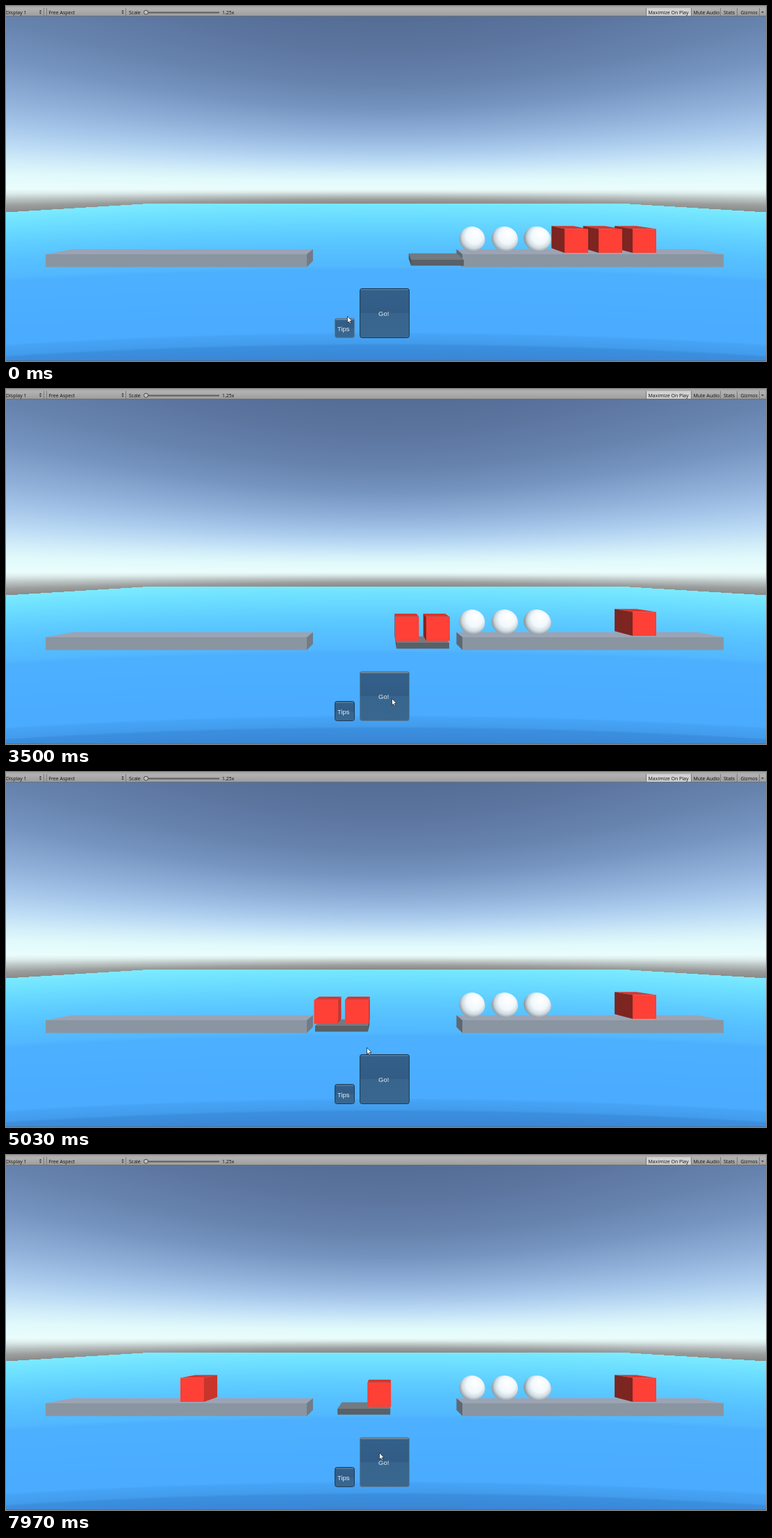
Write an HTML page with a canvas that moves like this. It is 1094 px wide and 512 px high and loops after 8 s.

```html
<!DOCTYPE html>
<html lang="en">
<head>
<meta charset="utf-8">
<title>River crossing</title>
<style>
html, body { margin: 0; width: 100%; height: 100%; overflow: hidden; background: #4bacff; }
canvas { display: block; }
</style>
</head>
<body>
<canvas id="stage" width="1094" height="512"></canvas>
<script>
const W = 1094, H = 512, LOOP = 8000, TICK = 77.3;
const VX = 547, VY = 263.5, FOCAL = 430;
const ctx = document.getElementById('stage').getContext('2d');

const RED = { front: '#ff4036', top: '#dc352d', left: '#7c2521', right: '#c9342b' };
const STONE = { front: '#8a95a2', top: '#9ca3b3', left: '#5d6873', right: '#717c88' };
const WOOD = { front: '#596066', top: '#737a80', left: '#464c52', right: '#51585e' };

// [offset above the horizon, colour]
const SKY = [[-40, '#7f7d7a'], [-22, '#858583'], [-15, '#9a9d9c'], [-9, '#bcc6c5'], [-4, '#dcecea'],
  [0, '#eafdfc'], [12, '#e2fafb'], [24, '#d3eef9'], [40, '#bbdaf4'], [60, '#a3c3e8'], [85, '#8cabd5'],
  [115, '#7694c0'], [150, '#6683ae'], [200, '#5b759f'], [249, '#556d95']];
// [height at the centre line, colour]
const SEA = [[280, '#7ceaff'], [293, '#71e3ff'], [310, '#67d8ff'], [330, '#5dcbff'], [352, '#56c0ff'],
  [374, '#52b8ff'], [380, '#4db0ff'], [470, '#4aabff'], [473, '#46a3f5'], [486, '#439cec'],
  [489, '#3b8fdf'], [512, '#3985d3']];

// [tick, x, y]
const PATH = [[0, 491, 447], [2, 491, 447], [7, 522, 430], [9, 532, 425], [15, 803, 325], [20, 803, 325],
  [21, 806, 326], [23, 806, 326], [25, 867, 325], [26, 908, 387], [29, 934, 486], [31, 660, 468],
  [33, 555, 446], [50, 555, 446], [53, 529, 396], [58, 519, 397], [65, 519, 397], [69, 488, 455],
  [74, 488, 455], [80, 453, 336], [85, 453, 336], [90, 534, 429], [94, 534, 429], [96, 537, 429], [104, 537, 429]];
const HOLDS = [43, 49, 59, 101];

const rgb = hex => [1, 3, 5].map(i => parseInt(hex.substr(i, 2), 16));

function ramp(stops) {
  const pts = stops.map(([p, c]) => [p, rgb(c)]);
  return v => {
    let i = 1;
    while (i < pts.length - 1 && v > pts[i][0]) i++;
    const [a, ca] = pts[i - 1], [b, cb] = pts[i];
    const f = Math.min(1, Math.max(0, (v - a) / (b - a)));
    return ca.map((c, n) => c + (cb[n] - c) * f);
  };
}

function poly(c, fill, ...p) {
  c.fillStyle = fill;
  c.beginPath();
  for (let i = 0; i < p.length; i += 2) c.lineTo(p[i], p[i + 1]);
  c.closePath();
  c.fill();
}

// Block in one-point perspective; s is the scale of its back face.
function block(c, x, y, w, h, s, col) {
  const r = x + w, b = y + h;
  const px = v => VX + (v - VX) * s, py = v => VY + (v - VY) * s;
  poly(c, col.top, x, y, px(x), py(y), px(r), py(y), r, y);
  if (x > VX) poly(c, col.left, x, y, px(x), py(y), px(x), py(b), x, b);
  if (r < VX) poly(c, col.right, r, y, px(r), py(y), px(r), py(b), r, b);
  c.fillStyle = col.front;
  c.fillRect(x, y, w, h);
}

const cube = (x, y) => block(ctx, x, y, 34, 34.5, .927, RED);

function ball(c, x, rx) {
  const g = c.createRadialGradient(x + 5, 328, 2, x + 2, 334, 22);
  g.addColorStop(0, '#ffffff');
  g.addColorStop(.5, '#f0f8fc');
  g.addColorStop(.75, '#cfdae0');
  g.addColorStop(1, '#7f8a91');
  c.fillStyle = g;
  c.beginPath();
  c.ellipse(x, 336, rx, 17.8, .35, 0, 7);
  c.fill();
}

function text(c, str, x, y, size, color, font = '"Liberation Sans", Arial, sans-serif') {
  c.font = size + 'px ' + font;
  c.fillStyle = color;
  c.fillText(str, x, y);
}

function toolbar(c) {
  const label = (s, x) => text(c, s, x, 11.5, 7, '#111', '"Open Sans", sans-serif');
  const arrows = x => {
    poly(c, '#333', x - 1.7, 8, x + 1.7, 8, x, 5.8);
    poly(c, '#333', x - 1.7, 9.6, x + 1.7, 9.6, x, 11.8);
  };
  const g = c.createLinearGradient(0, 0, 0, 15);
  g.addColorStop(0, '#a2a2a2');
  g.addColorStop(.25, '#b2b2b2');
  g.addColorStop(1, '#9c9c9c');
  c.fillStyle = g;
  c.fillRect(0, 0, W, 15);
  c.fillStyle = '#6c7076';
  c.fillRect(0, 14, W, 1);
  c.fillStyle = '#d2d2d2';
  c.fillRect(922, 3, 64, 11);
  c.fillStyle = '#7a7a7a';
  for (const x of [54, 58, 172, 921, 986, 1028, 1052, 1084]) c.fillRect(x, 3, 1, 11);
  label('Display 1', 0);
  label('Free Aspect', 61.5);
  label('Scale', 177);
  label('1.25x', 311);
  label('Maximize On Play', 924.5);
  label('Mute Audio', 989.5);
  label('Stats', 1033);
  label('Gizmos', 1057.5);
  arrows(49.5);
  arrows(168);
  poly(c, '#444', 1087, 8, 1091, 8, 1089, 10.5);
  c.fillStyle = '#5e5e5e';
  c.fillRect(204, 8.5, 103, 2);
  c.beginPath();
  c.arc(201.5, 9.2, 3, 0, 7);
  c.fillStyle = '#c4c4c4';
  c.strokeStyle = '#444';
  c.fill();
  c.stroke();
}

function makeScene() {
  const cv = document.createElement('canvas');
  cv.width = W;
  cv.height = H;
  const c = cv.getContext('2d');
  const img = c.createImageData(W, H), sky = ramp(SKY), sea = ramp(SEA);
  for (let y = 0, i = 0; y < H; y++) {
    for (let x = 0; x < W; x++, i += 4) {
      const dx = x - VX;
      const shore = 285 + 12 * Math.max(0, Math.abs(dx) - 350) / 197;
      const col = y < shore
        ? sky((VY - y) / Math.hypot(1, dx / FOCAL))
        : sea(y - 17 * (dx / VX) ** 2);
      img.data.set(col, i);
      img.data[i + 3] = 255;
    }
  }
  c.putImageData(img, 0, 0);
  c.fillStyle = '#4f7396';
  c.fillRect(0, 511, W, 1);
  toolbar(c);
  block(c, 57, 358, 376, 18.5, .922, STONE);
  block(c, 657, 358, 376, 18.5, .922, STONE);
  ball(c, 671, 18.6);
  ball(c, 718, 19.2);
  ball(c, 765, 20);
  return cv;
}

function button(x, y, size, label, tx, ty, hover) {
  ctx.beginPath();
  ctx.roundRect(x + .5, y + .5, size - 1, size - 1, 3);
  const g = ctx.createLinearGradient(0, y, 0, y + size);
  g.addColorStop(0, '#33608a');
  g.addColorStop(.5, '#325c85');
  g.addColorStop(.5, '#37658d');
  g.addColorStop(1, '#3a678f');
  ctx.fillStyle = g;
  ctx.fill();
  ctx.fillStyle = hover ? '#6a8496' : '#4d7596';
  ctx.fillRect(x + 2, y + 1, size - 4, 2);
  ctx.strokeStyle = hover ? '#587b97' : '#1d3a55';
  ctx.lineWidth = 1;
  ctx.stroke();
  text(ctx, label, tx, ty, 9.5, '#e4ebf1');
}

function tips(left) {
  const line = (s, x, y) => text(ctx, s, x, y, 28.7, '#0b0d10');
  line('Tips', 257, 163.5);
  line('Devil: left -> ' + left, 100, 196.5);
  line('right -> ' + (3 - left), 353, 196.5);
  line('Priest: left -> 0', 100, 229.5);
  line('right-> 3', 360, 229.5);
}

function pointer(x, y, s = 1) {
  ctx.save();
  ctx.translate(x, y);
  ctx.scale(s, s);
  ctx.beginPath();
  for (const [px, py] of [[.5, .5], [.5, 10], [2.6, 8.1], [4, 11.2], [5.6, 10.5], [4.2, 7.5], [7, 7.3]]) ctx.lineTo(px, py);
  ctx.closePath();
  ctx.fillStyle = '#fff';
  ctx.strokeStyle = '#1c2733';
  ctx.lineWidth = .8;
  ctx.fill();
  ctx.stroke();
  ctx.restore();
}

function pointerAt(k) {
  let i = 1;
  while (i < PATH.length - 1 && k > PATH[i][0]) i++;
  const [a, ax, ay] = PATH[i - 1], [b, bx, by] = PATH[i];
  const f = (k - a) / (b - a);
  return [ax + (bx - ax) * f, ay + (by - ay) * f];
}

function boatAt(k) {
  const out = Math.max(0, k - 41.4), back = Math.max(0, k - 95.1);
  return Math.max(431, 583 - 5.85 * out) + 5.85 * back;
}

const within = (k, a, b) => k >= a && k < b;
const scene = makeScene();

function draw(t) {
  let k = Math.floor((t + 8) / TICK);
  if (HOLDS.includes(k)) k--;

  ctx.drawImage(scene, 0, 0);
  cube(902, 321.5);
  if (k < 25) cube(853, 321.5);
  if (k < 23) cube(804, 321.5);
  if (k >= 84) cube(251, 321.5);

  const x = boatAt(k);
  block(ctx, x, 366, 76, 8.5, .91, WOOD);
  const seats = [];
  if (within(k, 23, 84)) seats.push(x - 1.5);
  if (k >= 25) seats.push(x + 43);
  // Farthest from the view axis first
  seats.sort((a, b) => Math.abs(b + 17 - VX) - Math.abs(a + 17 - VX));
  seats.forEach(s => cube(s, 328.8));

  const onTips = k < 6 || within(k, 68, 76);
  const onGo = within(k, 6, 10) || within(k, 32, 55) || k >= 88;
  button(509, 407, 72, 'Go!', 536, 447, onGo);
  button(473, 450, 29, 'Tips', 477, 468.5, onTips);

  if (within(k, 1, 41)) tips(2);
  if (within(k, 73, 95)) tips(1);

  if (within(k, 26, 28)) pointer(867, 325, .85);
  const [mx, my] = pointerAt(k);
  pointer(mx, my, within(k, 26, 30) ? 1.4 : 1);
}

function loop() {
  draw(performance.now() % LOOP);
  requestAnimationFrame(loop);
}
loop();
</script>
</body>
</html>
```
